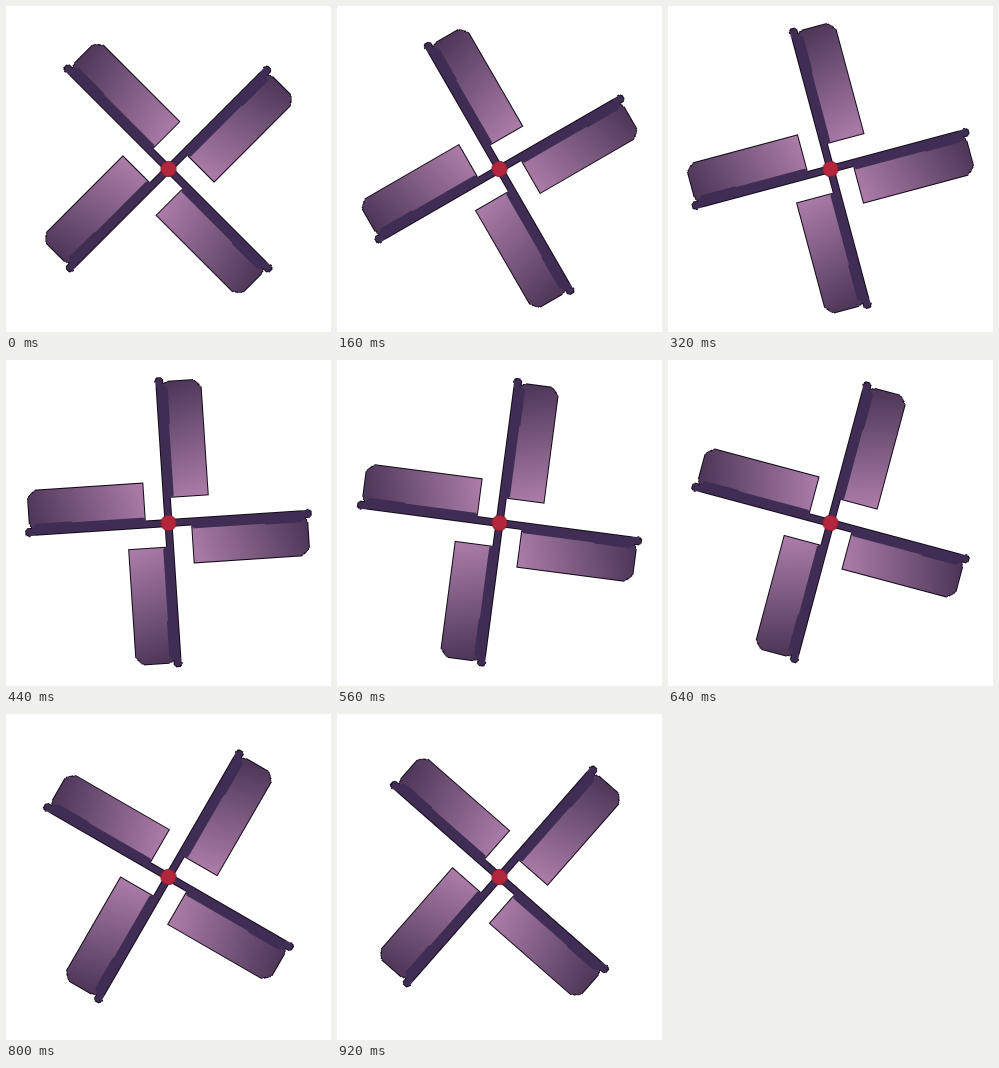
An HTML page for the animation above (960 ms loop, 325 by 326 pixels).

```html
<!DOCTYPE html>
<html lang="en">
<head>
<meta charset="utf-8">
<title>Windmill</title>
<style>
html, body { margin: 0; width: 100%; height: 100%; overflow: hidden; background: #fff; }
svg { display: block; width: 100vw; height: 100vh; }
.rotor { animation: turn 960ms steps(24) infinite; }
@keyframes turn {
  from { transform: rotate(-45deg); }
  to { transform: rotate(45deg); }
}
</style>
</head>
<body>
<svg viewBox="0 0 325 326">
  <defs>
    <linearGradient id="sheet" gradientUnits="userSpaceOnUse" x1="4" y1="-142" x2="38" y2="-23">
      <stop offset="0" stop-color="#4a3455"/>
      <stop offset=".5" stop-color="#7c5a80"/>
      <stop offset="1" stop-color="#ae7eaa"/>
    </linearGradient>
    <g id="blade" stroke="#120a18" stroke-linejoin="round" shape-rendering="crispEdges">
      <path d="M2-25V-138Q5-141 11-141.5L34-141Q37-140 41.3-133.5V-25.5Z" fill="url(#sheet)"/>
      <path d="M-3.5 0L-4-141Q-5-145 0-146Q4-145 4-140L3.5 0Z" fill="#402d54"/>
      <path d="M-3-2L-3.5-141L4-139L8-134L6.5-26L3-25V-2Z" fill="#402d54" stroke="none"/>
    </g>
  </defs>
  <g transform="translate(162.5 163)">
    <g class="rotor">
      <use href="#blade"/>
      <use href="#blade" transform="rotate(90) translate(0 2.5)"/>
      <use href="#blade" transform="rotate(180) translate(0 1.5)"/>
      <use href="#blade" transform="rotate(270) translate(0 2.5)"/>
    </g>
    <circle r="7.7" fill="#b3263b" stroke="#7a1c30" stroke-width=".8"/>
  </g>
</svg>
</body>
</html>
```
